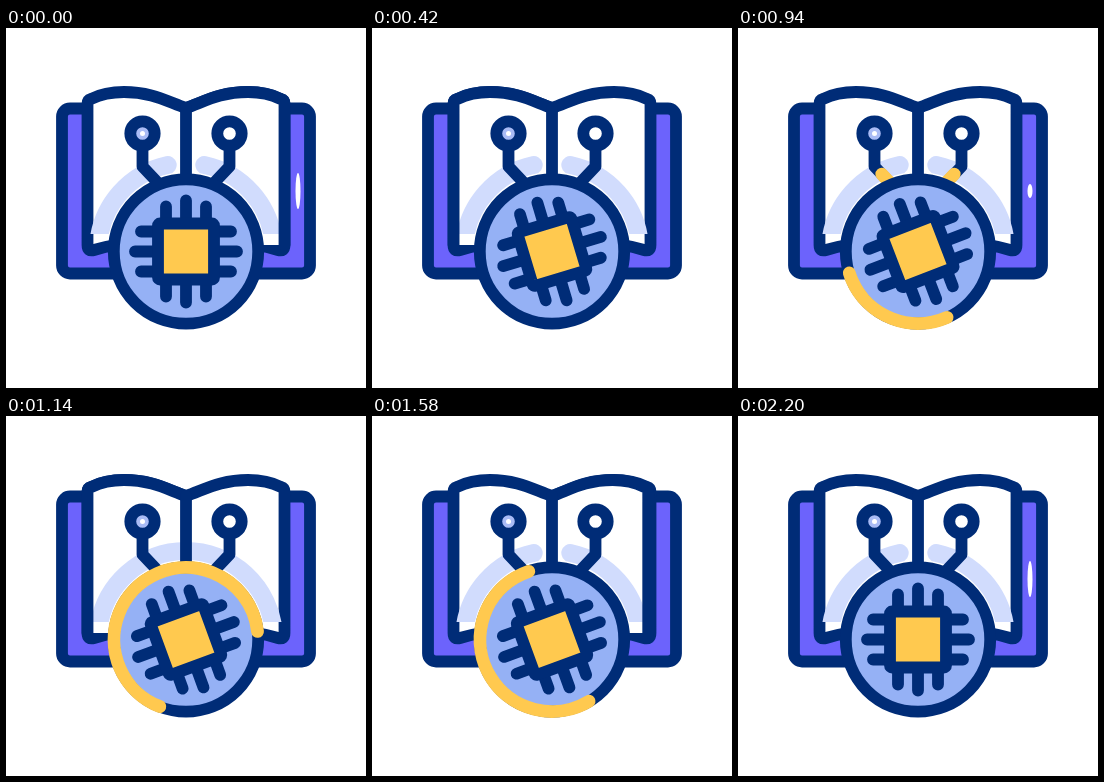
Recreate the animation shown at these times as an HTML page. Size 360 px wide and 360 px high, loop 2.4 s.

```html
<!DOCTYPE html>
<html lang="en">
<head>
<meta charset="utf-8">
<title>Book and chip</title>
<style>
  html, body { margin: 0; width: 100%; height: 100%; overflow: hidden; background: #fff; }
  svg { display: block; width: 100%; height: 100%; }
  .line { fill: none; stroke: #002c77; stroke-width: 11.8; stroke-linecap: round; stroke-linejoin: round; }
  .signal { stroke: #ffc94f; stroke-width: 12.8; }
</style>
</head>
<body>
<svg viewBox="0 0 360 360">
  <defs>
    <clipPath id="aboveFold"><path d="M0 0H360V206H0Z"/></clipPath>
    <path id="wire" d="M136.500 122V138.500L153 156"/>
    <path id="pins" d="M-20 -30V-45M0 -30V-51M20 -30V-45"/>
    <path id="page" d="M180 80C162 74 146 64 118 64C105 64 95 66 85 71Q81.500 72 81.500 76V217Q81.500 224 88 222Q135 208 180 224"/>
  </defs>

  <rect class="line" x="56" y="80.500" width="248" height="165" rx="8" style="fill:#6c63fc"/>
  <ellipse id="glint" cx="292" cy="163" rx="2.500" fill="#fff"/>
  <g class="line" style="fill:#fff">
    <use href="#page"/>
    <use href="#page" transform="matrix(-1 0 0 1 360 0)"/>
  </g>
  <path id="leafFill" fill="#fff"/>
  <g clip-path="url(#aboveFold)">
    <path id="arc" pathLength="170" fill="none" stroke="#d1dcfd" stroke-width="18" stroke-linecap="round"
      d="M267.700 215.800A88 88 0 0 0 92.300 215.800"/>
  </g>
  <path id="leafLine" class="line"/>
  <path class="line" d="M180 80V150"/>

  <g class="line">
    <use href="#wire"/>
    <use href="#wire" transform="matrix(-1 0 0 1 360 0)"/>
  </g>
  <g id="pulse" class="line signal">
    <use href="#wire"/>
    <use href="#wire" transform="matrix(-1 0 0 1 360 0)"/>
  </g>
  <circle class="line" cx="136.500" cy="105.500" r="12.200" style="fill:#a9bbf5"/>
  <circle cx="136.500" cy="105.500" r="2.500" fill="#fff"/>
  <circle class="line" cx="223.500" cy="105.500" r="12.200" style="fill:#fff"/>

  <g transform="translate(180 223.500)">
    <circle class="line" r="72.200" style="fill:#95b1f5"/>
    <circle id="ring" class="line signal" r="72" pathLength="360"/>
    <g id="chip" class="line">
      <use href="#pins"/>
      <use href="#pins" transform="rotate(90)"/>
      <use href="#pins" transform="rotate(180)"/>
      <use href="#pins" transform="rotate(270)"/>
      <rect x="-28" y="-28" width="56" height="56" rx="2" fill="#ffc94f"/>
    </g>
  </g>
</svg>
<script>
const LOOP = 2400;
const $ = id => document.getElementById(id);
const set = (id, name, value) => $(id).setAttribute(name, value);

// Smooth interpolation through [time, value] keys without overshoot.
function track(keys) {
  const slope = i => keys[i + 1] && keys[i]
    ? (keys[i + 1][1] - keys[i][1]) / (keys[i + 1][0] - keys[i][0]) : 0;
  const tangent = i => {
    const a = slope(i - 1), b = slope(i);
    return a * b > 0 ? 2 * a * b / (a + b) : 0;
  };
  return t => {
    if (t <= keys[0][0]) return keys[0][1];
    const i = keys.findIndex((k, n) => n + 1 < keys.length && t < keys[n + 1][0]);
    if (i < 0) return keys[keys.length - 1][1];
    const [t0, a] = keys[i], [t1, b] = keys[i + 1];
    const d = t1 - t0, u = (t - t0) / d, v = 1 - u;
    return a * v * v * (1 + 2 * u) + b * u * u * (3 - 2 * u)
      + d * u * v * (tangent(i) * v - tangent(i + 1) * u);
  };
}

const chipAngle = track([[0, 0], [260, -6], [640, -29], [940, -21], [1200, -20], [1680, -20], [2180, 0]]);
const wireHead = track([[440, 0], [640, 22], [820, 40]]);
const wireTail = track([[560, 0], [640, 2], [940, 27], [1060, 40]]);
const ringHead = track([[780, 50], [940, 162], [1300, 486], [1580, 611], [1800, 645]]);
const ringTail = track([[780, 50], [940, 66], [1300, 170], [1580, 418], [1800, 645]]);
const arcLength = track([[1120, 170], [1300, 126], [1400, 95], [1560, 170]]);
const glintSize = track([[300, 18], [400, 0], [900, 0], [940, 7], [980, 0], [2160, 0], [2190, 18]]);

// The leaf turns to the left, then back to the right.
const FLIPS = [
  { start: 0, time: 454, from: 98.5 },
  { start: 1127, time: 546, from: -98.5 },
];

function drawLeaf(t) {
  const flip = FLIPS.find(f => t > f.start && t < f.start + f.time);
  let top = "", edge = "";
  if (flip) {
    const eased = (1 - Math.cos(Math.PI * (t - flip.start) / flip.time)) / 2;
    const reach = flip.from * Math.cos(Math.PI * eased);
    const x = k => 180 + reach * k;
    top = `M180 80C${x(.18)} 74 ${x(.34)} 64 ${x(.63)} 64C${x(.76)} 64 ${x(.86)} 66 ${x(.96)} 71`;
    edge = `Q${x(1)} 72 ${x(1)} 76V217`;
  }
  set("leafFill", "d", top && top + edge + "L180 217Z");
  set("leafLine", "d", top + edge);
}

function drawDash(id, tail, head) {
  const length = head - tail;
  set(id, "visibility", length > 0.1 ? "visible" : "hidden");
  set(id, "stroke-dasharray", `${Math.min(length, 360)} 999`);
}

function render(t) {
  drawLeaf(t);
  set("chip", "transform", `rotate(${chipAngle(t)})`);
  drawDash("pulse", wireTail(t), wireHead(t));
  set("pulse", "stroke-dashoffset", -wireTail(t));
  drawDash("ring", ringTail(t), ringHead(t));
  set("ring", "transform", `rotate(${ringTail(t)})`);
  set("arc", "stroke-dasharray", t > 1120 && t < 1560 ? `${arcLength(t)} 999` : "73 24 73 999");
  set("glint", "ry", glintSize(t));
}

function tick() {
  render(performance.now() % LOOP);
  requestAnimationFrame(tick);
}
tick();
</script>
</body>
</html>
```
